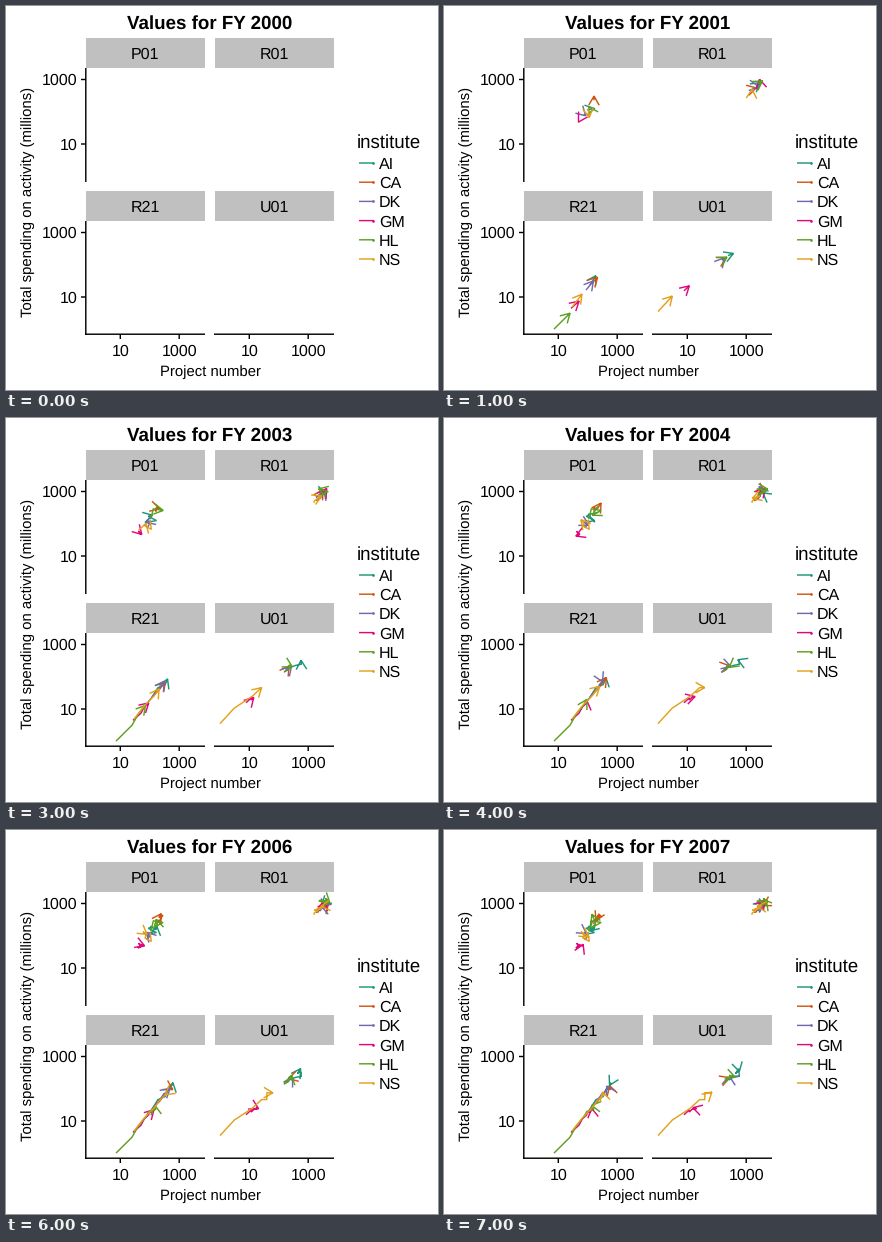
Animation, 432 px wide and 384 px high, one loop 8 s. Source, as a matplotlib script:

```python
import numpy as np
import matplotlib.pyplot as plt
from matplotlib.animation import FuncAnimation
from matplotlib.patches import Rectangle

W, H, DPI = 432, 384, 96
FIRST_YEAR, YEARS = 2000, 8
HEAD, HEAD_ANGLE = 10.5, np.radians(30)
LINE = 1.07
LEFTS, TOPS = (79.5, 208.5), (62, 215)
PANEL_W, PANEL_H, STRIP_H = 119.5, 114, 30

COLORS = {"AI": "#1b9578", "CA": "#d0540f", "DK": "#7068ae",
          "GM": "#e0077f", "HL": "#5ba021", "NS": "#e3a01b"}

# Per panel: a point on the spending trend, its slope, the yearly scatter,
# and each institute's first and last x along that trend.
TRENDS = {
    "P01": ((153, 90), -1.4, 3.0,
            [(143, 150), (150, 153), (140, 143), (135, 136), (145, 153), (144, 141)]),
    "R01": ((320, 71), -1.15, 2.2,
            [(313, 319), (310, 318), (312, 318), (316, 320), (314, 321), (308, 316)]),
    "R21": ((165, 256), -1.22, 1.3,
            [(146, 166), (147, 165), (142, 163), (127, 146), (110, 149), (128, 160)]),
    "U01": ((286, 248), -0.8, 1.6,
            [(284, 296), (280, 284), (278, 287), (240, 250), (279, 287), (214, 269)]),
}

rng = np.random.default_rng(4)
plt.rcParams["font.family"] = "Liberation Sans"
plt.rcParams["text.hinting"] = "none"
fig = plt.figure(figsize=(W / DPI, H / DPI), dpi=DPI, facecolor="white")
ax = fig.add_axes([0, 0, 1, 1])
ax.set_xlim(0, W)
ax.set_ylim(H, 0)
ax.axis("off")


def label(x, y, text, size=12, ha="center", **kw):
    return ax.text(x, y, text, fontsize=size, ha=ha, va="baseline", **kw)


def rule(xs, ys, color="black"):
    ax.plot(xs, ys, color=color, lw=LINE, solid_capstyle="butt", snap=False)


def yearly_points(anchor, slope, scatter, x0, x1):
    """Growth that levels off along the trend, with some scatter."""
    growth = 1 - np.exp(-np.arange(YEARS) / 2.5)
    x = x0 + (x1 - x0) * growth / growth[-1]
    y = anchor[1] + slope * (x - anchor[0])
    noise = rng.normal(0, scatter, (YEARS, 2))
    noise[0] = 0
    return np.column_stack([x, y]) + noise


def arrow_path(pts):
    """Polyline ending in an open arrowhead."""
    if len(pts) < 2:
        return [], []
    tip = pts[-1]
    dx, dy = pts[-2] - tip
    back = np.arctan2(dy, dx)
    wings = [tip + HEAD * np.array([np.cos(a), np.sin(a)])
             for a in (back - HEAD_ANGLE, back + HEAD_ANGLE)]
    gap = [np.nan, np.nan]
    return np.vstack([pts, gap, wings[0], tip, wings[1]]).T


def draw_axes():
    left, bottom = LEFTS[0] + 0.3, TOPS[1] + PANEL_H - 0.8
    for top in TOPS:
        rule([left, left], [top, top + PANEL_H])
        for y, text in ((top + 11.5, "1000"), (top + 76, "10")):
            rule([75, left], [y, y])
            label(71.5, y + 5.5, text, ha="right")
    for x0 in LEFTS:
        rule([x0 - 0.5, x0 + PANEL_W], [bottom, bottom])
        for x, text in ((x0 + 34.8, "10"), (x0 + 93.7, "1000")):
            rule([x, x], [bottom, 333])
            label(x, 350, text)
    label(204, 370, "Project number", 11.2)
    label(25.5, 196, "Total spending on activity (millions)", 11.2,
          rotation=90, rotation_mode="anchor")


def draw_legend():
    label(350.7, 142, "institute", 14, ha="left")
    for i, (name, color) in enumerate(COLORS.items()):
        y = 157 + 19.2 * i
        rule([353, 368], [y, y], color)
        ax.plot(366.5, y, "o", color=color, ms=2, mew=0)
        label(373, y + 6, name, ha="left")


def draw_panels():
    lines = []
    corners = [(left, top) for top in TOPS for left in LEFTS]
    for (left, top), (name, trend) in zip(corners, TRENDS.items()):
        ax.add_patch(Rectangle((left, top - STRIP_H), PANEL_W, STRIP_H,
                               fc="#c0c0c0", ec="none"))
        label(left + PANEL_W / 2, top - 9, name)
        clip = Rectangle((left, top), PANEL_W, PANEL_H, transform=ax.transData)
        *shape, spans = trend
        for color, span in zip(COLORS.values(), spans):
            line, = ax.plot([], [], color=color, lw=LINE,
                            solid_capstyle="butt", solid_joinstyle="miter")
            line.set_clip_path(clip)
            lines.append((line, yearly_points(*shape, *span)))
    return lines


title = label(203.3, 23, "", 14.1, weight="bold")
paths = draw_panels()
draw_axes()
draw_legend()


def update(i):
    title.set_text(f"Values for FY {FIRST_YEAR + i}")
    for line, pts in paths:
        line.set_data(*arrow_path(pts[:i + 1]))
    return [title] + [line for line, _ in paths]


anim = FuncAnimation(fig, update, frames=YEARS, init_func=lambda: update(0),
                     interval=1000, repeat=True, repeat_delay=0)
plt.show()
```
